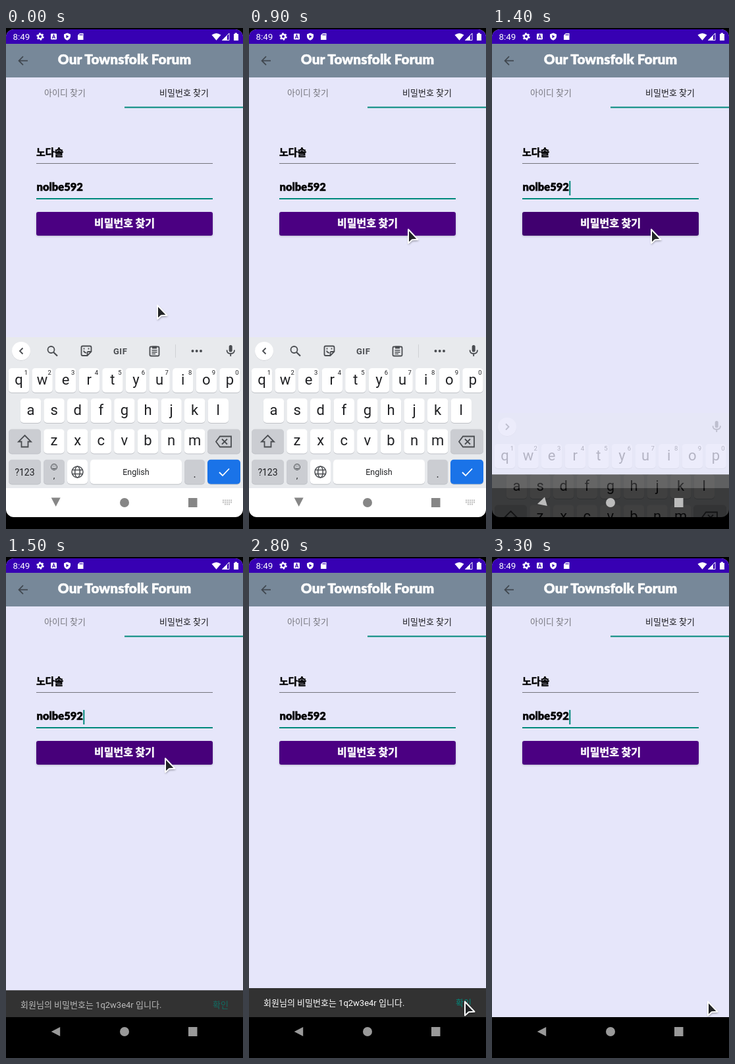
Recreate the animation shown at these times as an HTML page. Size 360 px wide and 760 px high, loop 3500 ms.

```html
<!DOCTYPE html>
<html lang="ko">
<head>
<meta charset="utf-8">
<title>비밀번호 찾기</title>
<style>
html, body { margin: 0; width: 100%; height: 100%; overflow: hidden; background: #000; }
svg { display: block; width: 360px; height: 760px; }
text { font-family: Roboto, "Noto Sans CJK KR", "Noto Sans CJK", sans-serif; font-size: 13px; }
.heavy {
  font-family: Lato, "Noto Sans CJK KR", "Noto Sans CJK", sans-serif; font-weight: 900;
  fill: currentColor; stroke: currentColor; stroke-width: .45;
}
.light { color: #fff; }
.mid { text-anchor: middle; }
.line { fill: none; stroke: #4a4d51; stroke-width: 1.8; }
</style>
</head>
<body>
<svg viewBox="0 0 360 760">
  <defs>
    <clipPath id="screen"><rect y="2" width="360" height="740" rx="12"/></clipPath>
    <clipPath id="content"><rect width="360" height="698"/></clipPath>
    <clipPath id="btnClip"><rect x="46" y="279" width="268" height="36" rx="3"/></clipPath>
    <filter id="soft" x="-50%" y="-50%" width="200%" height="200%"><feGaussianBlur stdDeviation="1.5"/></filter>
  </defs>
  <rect width="360" height="760"/>
  <g clip-path="url(#screen)">
    <rect y="2" width="360" height="696" fill="#e6e6fa"/>
    <rect width="360" height="24" fill="#3700b3"/>
    <rect y="24" width="360" height="51" fill="#778899"/>

    <g fill="#fff">
      <text x="10.500" y="18" style="font-size:13.400px">8:49</text>
      <circle cx="52" cy="13" r="3.200" fill="none" stroke="#fff" stroke-width="2.400"/>
      <circle cx="52" cy="13" r="4.900" fill="none" stroke="#fff" stroke-width="1.700" stroke-dasharray="2.57 2.56"/>
      <rect x="68" y="8.500" width="9" height="9" rx="1.200"/>
      <path d="M70.300 15.800L72.500 10.200L74.700 15.800M71 14.200H74" fill="none" stroke="#3700b3" stroke-width="1.100"/>
      <path d="M93 7.500L98 9.400V13Q97.500 17 93 18.800Q88.500 17 88 13V9.400Z"/>
      <path d="M91.500 10.500V15.500L95.500 13Z" fill="#3700b3"/>
      <path d="M112 8H117.500V18H109V11Z"/>
      <path d="M112.300 9V11.500M114 9V11.500M115.700 9V11.500" stroke="#3700b3" stroke-width=".9"/>
      <path d="M312.500 10.500Q319.500 5.500 326.500 10.500L319.500 18.800Z"/>
      <path d="M339 8V18.500H328.500Z" fill="none" stroke="#fff"/>
      <path d="M336 11V18.500H328.500Z"/>
      <path d="M346 9H347.500V7.500H351V9H353V19H346Z"/>
    </g>

    <path d="M33 49.700H20M26 43.200L19.500 49.700L26 56.200" fill="none" stroke="#40474f" stroke-width="1.700"/>
    <text class="heavy light mid" x="180" y="55" style="font-size:20.800px">Our Townsfolk Forum</text>
    <text class="mid" x="89.500" y="102.500" fill="#77777f">아이디 찾기</text>
    <text class="mid" x="270.500" y="102.500" fill="#1c1c20">비밀번호 찾기</text>
    <rect x="180" y="119.400" width="180" height="2" fill="#00897b"/>

    <text class="heavy" x="46" y="194" style="font-size:15px">노다솔</text>
    <rect x="46" y="205" width="268" height="1" fill="#74747c"/>
    <text class="heavy" x="46.500" y="247" style="font-size:16.500px">nolbe592</text>
    <rect x="46" y="258" width="268" height="2" fill="#00897b"/>
    <rect id="caret" x="117.300" y="232" width="2" height="22" fill="#00897b"/>

    <rect id="shade" x="46" y="280" width="268" height="36" rx="3" filter="url(#soft)"/>
    <rect x="46" y="279" width="268" height="36" rx="3" fill="#4b0082"/>
    <g clip-path="url(#btnClip)"><circle id="ripple" cy="297" opacity=".15"/></g>
    <text class="heavy light mid" x="180" y="301.500" style="font-size:16px">비밀번호 찾기</text>

    <g clip-path="url(#content)">
      <g id="snack">
        <rect width="360" height="46" fill="#323232"/>
        <g id="message">
          <text x="22" y="26.500" fill="#fff">회원님의 비밀번호는 1q2w3e4r 입니다.</text>
          <text x="314" y="26.500" fill="#00897b">확인</text>
        </g>
      </g>
    </g>
    <rect y="698" width="360" height="62"/>

    <g id="fade"><g id="board">
      <rect y="469" width="360" height="230" fill="#e8eaed"/>
      <rect y="698" width="360" height="44" fill="#fff"/>
      <circle cx="23" cy="490.700" r="14" fill="#c9cbd0"/>
      <circle cx="23" cy="490" r="14" fill="#fff"/>
      <path id="chevron" class="line"/>
      <g id="tools">
        <g class="line">
          <circle cx="68.500" cy="488" r="5"/>
          <path d="M72.300 492L78 497.500" stroke-width="2.200"/>
          <path d="M116.500 482.500H127.500Q129.500 482.500 129.500 484.500V491L123.500 497H116.500Q114.500 497 114.500 495V484.500Q114.500 482.500 116.500 482.500ZM129.500 491H125Q123.500 491 123.500 492.500V497M118 489.500Q119 493 122 492.500"/>
          <path d="M118.500 485.500V487.500M125.500 485.500V487.500"/>
          <rect x="218.500" y="483.500" width="14" height="14" rx="1.500"/>
          <path d="M222 484.500H229" stroke-width="4"/>
          <path d="M221.500 489H229.500M221.500 491.700H229.500M221.500 494.400H227" stroke-width="1.400"/>
        </g>
        <text class="mid" x="173.700" y="494.500" font-weight="700" letter-spacing=".6" fill="#4a4d51">GIF</text>
        <rect x="257" y="480" width="1" height="20" fill="#cfd1d5"/>
        <g fill="#4a4d51">
          <circle cx="283.500" cy="490" r="2"/><circle cx="289.700" cy="490" r="2"/><circle cx="296" cy="490" r="2"/>
        </g>
        <path d="M329 716.500H344M329 719.500H344M332 722.500H341" stroke="#bdbdbd" stroke-width="2" stroke-dasharray="2 1"/>
      </g>
      <rect x="338.700" y="481" width="5" height="10.500" rx="2.500" fill="#4a4d51"/>
      <path class="line" d="M335.500 488.500Q335.500 494 341.200 494Q347 494 347 488.500M341.200 494V498"/>
      <g id="keys"></g>
      <g class="line">
        <path d="M28.500 618L38 627.500H33.500V635.500H23.500V627.500H19Z"/>
        <path d="M325 619.500H342V635.500H325L319 627.500ZM328 623.500L336 631.500M336 623.500L328 631.500"/>
        <g style="stroke-width:1.100">
          <circle cx="73" cy="666" r="4.500"/>
          <path d="M70.500 667.500Q73 670 75.500 667.500M71.500 663.800V665M74.500 663.800V665"/>
        </g>
        <g style="stroke-width:1.500">
          <circle cx="108.500" cy="673.500" r="8.500"/>
          <ellipse cx="108.500" cy="673.500" rx="3.800" ry="8.500"/>
          <path d="M101 670.500H116M101 676.500H116"/>
        </g>
      </g>
      <path d="M324 674L329 679L339 668.500" fill="none" stroke="#fff" stroke-width="1.800"/>
    </g></g>

    <g id="nav">
      <path id="back" d="M-7 0L6.500 -7V7Z"/>
      <circle cx="180" cy="720" r="7"/>
      <rect x="277" y="713" width="13.500" height="14"/>
    </g>
  </g>
  <g id="mouse">
    <path d="M1 2V25L7 19.500L17 19Z" opacity=".35" filter="url(#soft)"/>
    <path d="M1 1.500V22.500L6.800 17.300L15.500 16.800Z" fill="#222426" stroke="#fff" stroke-width="2" stroke-linejoin="round"/>
  </g>
</svg>
<script>
const LOOP = 3500, STEP = 100;
const $ = id => document.getElementById(id);
const set = (id, attrs) => {
  for (const k in attrs) $(id).setAttribute(k, attrs[k]);
};
const show = (id, on) => { $(id).style.display = on ? '' : 'none'; };
const clamp = x => Math.max(0, Math.min(1, x));
const mix = (a, b, p) => a + (b - a) * p;
const ease = x => x * x * (3 - 2 * x);
const easeOut = x => 1 - (1 - x) ** 2;
const span = (t, from, to) => clamp((t - from) / (to - from));

// Keyboard
const PITCH = 35.6;
const box = (x, y, w, fill) =>
  `<rect x="${x}" y="${y + 1}" width="${w}" height="37" rx="5" fill="#bfc2c7"/>` +
  `<rect x="${x}" y="${y}" width="${w}" height="37" rx="5" fill="${fill}"/>`;
const label = (x, y, size, s) =>
  `<text class="mid" x="${x}" y="${y}" style="font-size:${size}px" fill="#202124">${s}</text>`;

function buildKeys() {
  const grey = '#cbcdd2';
  let out = '';
  [['qwertyuiop', 19.5, 516], ['asdfghjkl', 37.5, 562], ['zxcvbnm', 73, 608.5]].forEach(([row, x0, y], r) => {
    [...row].forEach((c, i) => {
      const x = x0 + i * PITCH;
      out += box(x - 15.7, y, 31.4, '#fff') + label(x, y + 24.5, 22, c);
      if (!r) out += label(x + 11, y + 10, 9.5, (i + 1) % 10);
    });
  });
  out += box(4, 608.5, 49, grey) + box(306, 608.5, 50, grey);
  [[4, 49, grey], [57, 32, grey], [93, 31, '#fff'], [128, 139, '#fff'], [271, 31, grey], [306, 50, '#1a73e8']]
    .forEach(([x, w, fill]) => out += box(x, 654.8, w, fill));
  out += label(28.5, 678.5, 14, '?123') + label(73, 683, 13, ',') +
    label(197.5, 678, 12.5, 'English') + label(286.5, 682, 16, '.');
  $('keys').innerHTML = out;
}

function mouseAt(t) {
  if (t < 1600) {
    const p = ease(span(t, 420, 880));
    return [mix(229, 241, p), mix(419, 304, p)];
  }
  const p = easeOut(span(t, 1600, 2060));
  return [mix(241, 327, p), mix(304, 673, p)];
}

function draw(now) {
  const t = Math.floor((now % LOOP) / STEP) * STEP;

  show('caret', (t + 700) % 1000 < 500);
  set('mouse', { transform: `translate(${mouseAt(t)})` });

  // Button press
  const grow = span(t, 1150, 1400);
  show('ripple', t >= 1200 && t < 1600);
  set('ripple', {
    cx: mix(241, 180, grow), r: mix(80, 137, grow),
    opacity: t < 1500 ? 0.15 : 0.06
  });
  set('shade', { opacity: t === 1200 || t === 1300 ? 0.35 : 0.2 });

  // Keyboard slides away
  const leaving = t >= 1400;
  show('fade', t < 1500);
  set('fade', { opacity: leaving ? 0.25 : 1 });
  set('board', { transform: `translate(0 ${leaving ? 115 : 0})` });
  show('tools', !leaving);
  set('chevron', { d: leaving ? 'M21 485.500L25.500 490L21 494.500' : 'M25.500 485.500L21 490L25.500 494.500' });
  const turn = t < 1400 ? -90 : t < 1500 ? -16 : 0;
  set('back', { transform: `translate(75.700 ${leaving ? 720 : 719}) rotate(${turn})` });
  set('nav', { fill: t < 1400 ? '#868686' : t < 1500 ? '#bcbcbc' : '#999' });

  // Message bar
  const rise = easeOut(span(t, 1340, 1560));
  const drop = ease(span(t, 2950, 3200));
  show('snack', leaving && t < 3200);
  set('snack', { transform: `translate(0 ${mix(698, 654, rise) + 44 * drop})` });
  set('message', { opacity: span(t, 1400, 1550) });
}

buildKeys();
const start = performance.now();
function tick() {
  draw(performance.now() - start);
  requestAnimationFrame(tick);
}
tick();
</script>
</body>
</html>
```
